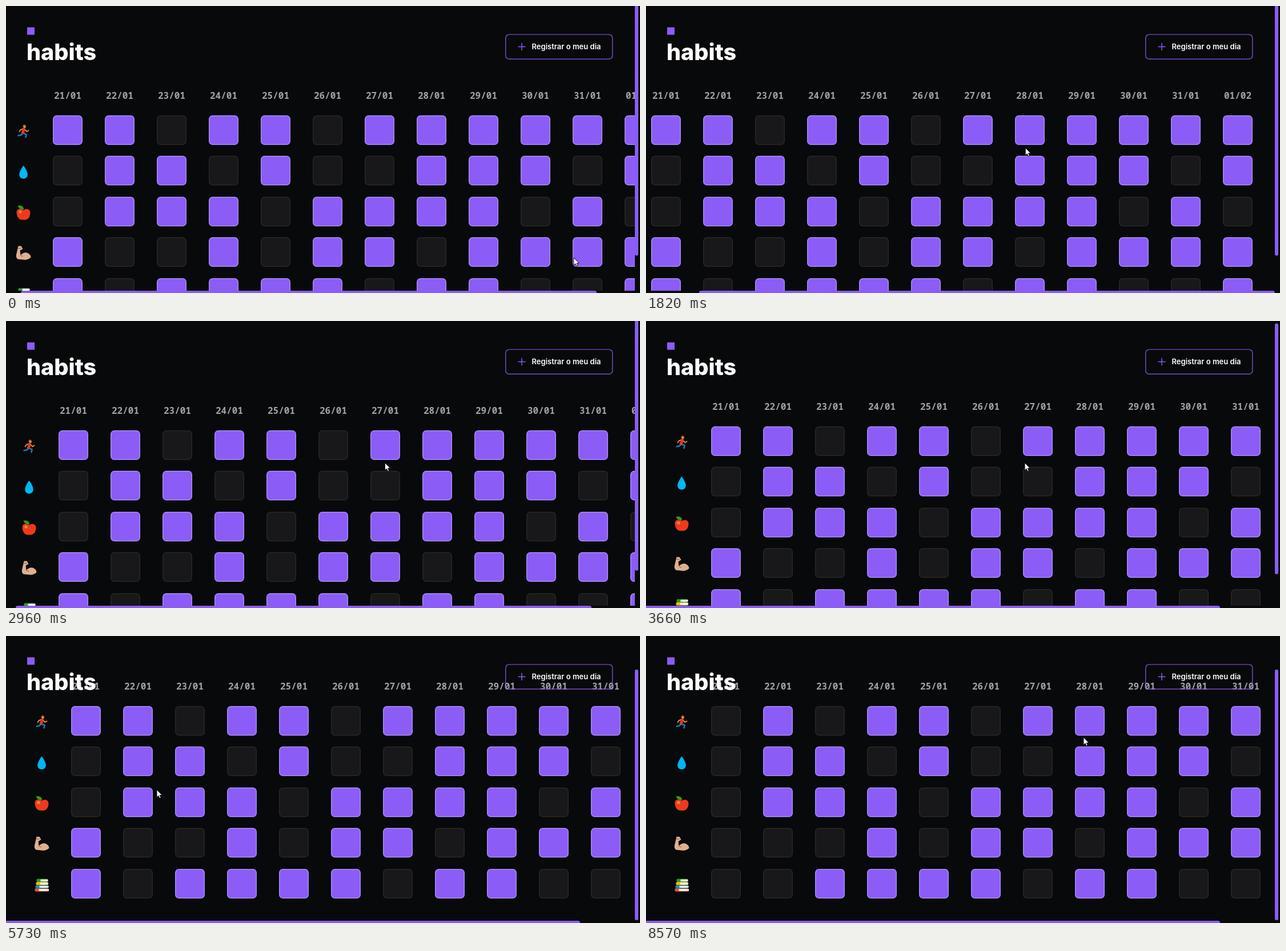
An HTML page that plays this animation: 1110x504 px, repeating every 8770 ms.

```html
<!DOCTYPE html>
<html lang="pt">
<head>
<meta charset="utf-8">
<title>habits</title>
<style>
  html, body { margin: 0; width: 100%; height: 100%; overflow: hidden; background: #08090a; }
  svg { display: block; }
  .date { font: 700 16px "Noto Sans Mono", monospace; fill: #a1a1aa; text-anchor: middle; }
  .title { font: 800 39.5px Inter, sans-serif; fill: #fff; }
  .label { font: 600 13px Inter, sans-serif; fill: #fff; }
  .cell { fill: #18181b; stroke: #27272a; stroke-width: 1.5; }
  .cell.done { fill: #8b5cf6; stroke: #a78bfa; }
  .page { fill: #08090a; }
  .thumb { fill: #8b5cf6; }
  .line { fill: none; stroke-linecap: round; stroke-linejoin: round; }
</style>
</head>
<body>
<svg width="1110" height="504" viewBox="0 0 1110 504">
  <g id="grid"></g>

  <rect class="thumb" x="37" y="37.5" width="13" height="13"/>
  <text class="title" x="36" y="95">habits</text>
  <rect x="874.8" y="50" width="187" height="43.2" rx="6" fill="none" stroke="#8b5cf6" stroke-width="1.2"/>
  <path class="line" d="M897 71.5h12M903 65.5v12" stroke="#8b5cf6" stroke-width="1.5"/>
  <text class="label" x="920.5" y="76.3">Registrar o meu dia</text>

  <rect class="page" x="1101" width="9" height="504"/>
  <rect class="page" y="500" width="1110" height="4"/>
  <rect class="thumb" id="thumbX" y="500" width="1008" height="7" rx="3.5"/>
  <rect class="thumb" id="thumbY" x="1101" width="6" height="440.5" rx="3"/>
  <path id="cursor" d="M0 0V13.3L3 10.5 5 15 7.2 14 5.2 9.7H9.4Z" fill="#fff" stroke="#000" stroke-width=".9"/>
</svg>

<script>
const LOOP = 8770, FRAME = 70;
const LEFT = 114, TOP = 192, SIZE = 52, COL = 91, ROW = 71.5, DAYS = 12;

const line = (d, color, width) =>
  `<path class="line" d="${d}" stroke="${color}" stroke-width="${width}"/>`;
const shape = (d, color) => `<path d="${d}" fill="${color}"/>`;
const dot = (x, y, r, color) => `<circle cx="${x}" cy="${y}" r="${r}" fill="${color}"/>`;

const runner =
  line('M0 -5L-5 -3-7 0M2 -4L6 0 9 -2', '#e08a3c', 2) +
  line('M-1 3L-4 6-9 7M0 3L5 5 4 10', '#1479c9', 2.6) +
  line('M1 -4L-1 2', '#e5391f', 5) +
  dot(1.5, -10, 2.6, '#6b3a1e') + dot(2, -8.5, 2.4, '#e08a3c');
const drop = shape('M0 -11.5Q7.3 -1 7.3 4.5A7.3 7.3 0 0 1 -7.3 4.5Q-7.3 -1 0 -11.5Z', '#00b7f4');
const apple =
  shape('M0 -5C5 -9 12 -7 12 0Q11 13 0 12Q-11 13 -12 -1C-12 -8 -5 -9 0 -5Z', '#ee3a1b') +
  shape('M-10 -13Q0 -15 1 -6Q-8 -6 -10 -13Z', '#2a9d1a') +
  dot(-5.5, -2, 2.6, '#ff7a5c');
const arm =
  shape('M-9 -13H-4L-1 -8-6 -5-5 3Q1 -3 7 -1 13 2 13 7 8 12 0 11L-10 10Q-14 7 -12 0Z', '#dfb08e') +
  line('M-9 -9H-4M-5 3Q-4 5 -1 5', '#7d5a43', 1);
const books = ['#2a9d1a', '#f2b600', '#1687d9', '#f4511e'].map((color, i) => {
  const x = -9 - i, y = -11 + i * 5.6;
  return `<rect x="${x}" y="${y}" width="${20 + 1.5 * i}" height="5.4" rx="2" fill="${color}"/>` +
    `<rect x="${x + 7}" y="${y + 1}" width="${13 + 1.5 * i}" height="3.4" rx="1" fill="#fff"/>`;
}).join('');

const habits = [
  { icon: runner, log: 'xx.xx.xxxxxx', clearAt: 6360 },
  { icon: drop, log: '.xx.x..xxx.x' },
  { icon: apple, log: '.xxx.xxxx.x.' },
  { icon: arm, log: 'x..x.xx.xxxx', clearAt: 7330 },
  { icon: books, log: 'x.xxxx.xx..x', clearAt: 7680 },
];

const byId = id => document.getElementById(id);
const grid = byId('grid'), cursor = byId('cursor');
const thumbX = byId('thumbX'), thumbY = byId('thumbY');

const dates = Array.from({ length: DAYS }, (_, c) => {
  const date = new Date(2023, 0, 21 + c);
  const label = [date.getDate(), date.getMonth() + 1].map(n => String(n).padStart(2, '0')).join('/');
  return `<text class="date" x="${LEFT + c * COL + SIZE / 2}" y="162.5">${label}</text>`;
});
const rows = habits.map(({ icon, log }, r) => {
  const y = Math.floor(TOP + r * ROW);
  const cells = [...log].map((mark, c) => `<rect class="cell${mark === 'x' ? ' done' : ''}"
    x="${LEFT + c * COL + .75}" y="${y + .75}" width="${SIZE - 1.5}" height="${SIZE - 1.5}" rx="6"/>`);
  return `<g transform="translate(62.5 ${y + 28.5})">${icon}</g>` + cells.join('');
});
grid.innerHTML = dates.join('') + rows.join('');
const firstCells = [...grid.querySelectorAll('.cell')].filter((_, i) => i % DAYS === 0);

// Where the pointer pauses or turns
const stops = [
  { at: 0, x: 994, y: 442 }, { at: 1010, x: 664.5, y: 249 }, { at: 4060, x: 663, y: 249 },
  { at: 4480, x: 1082, y: 400 }, { at: 4830, x: 592, y: 440 }, { at: 5170, x: 975, y: 400 },
  { at: 5730, x: 264, y: 270 }, { at: 6300, x: 150, y: 150 }, { at: 6780, x: 160, y: 321 },
  { at: 7330, x: 155, y: 360 }, { at: 7680, x: 152, y: 430 }, { at: 8080, x: 247, y: 405 },
  { at: 8570, x: 766, y: 178 },
];

const snap = (time, phase = 0) => phase + Math.floor((time - phase) / FRAME) * FRAME;

function ease(time, start, end) {
  const p = Math.min(1, Math.max(0, (time - start) / (end - start)));
  return p * p * (3 - 2 * p);
}

function pointerAt(time) {
  const to = stops.find(stop => stop.at > time) ?? stops.at(-1);
  const from = stops[stops.indexOf(to) - 1];
  const p = ease(time, from.at, to.at);
  return [from.x + (to.x - from.x) * p, from.y + (to.y - from.y) * p];
}

function draw() {
  const time = performance.now() % LOOP;
  const later = snap(time, 20);
  const scrollX = Math.round(32 + 73 * ease(snap(time), 1585, 1820) - 105 * ease(later, 2683, 3077));
  const scrollY = Math.round(69 * ease(later, 3620, 3820));
  grid.setAttribute('transform', `translate(${-scrollX} ${-scrollY})`);
  thumbX.setAttribute('x', -3 + scrollX * .913);
  thumbY.setAttribute('y', -2 + scrollY * .88);
  cursor.setAttribute('transform', `translate(${pointerAt(time)})`);
  habits.forEach(({ clearAt }, r) => {
    if (clearAt) firstCells[r].classList.toggle('done', time < clearAt);
  });
  requestAnimationFrame(draw);
}
draw();
</script>
</body>
</html>
```
